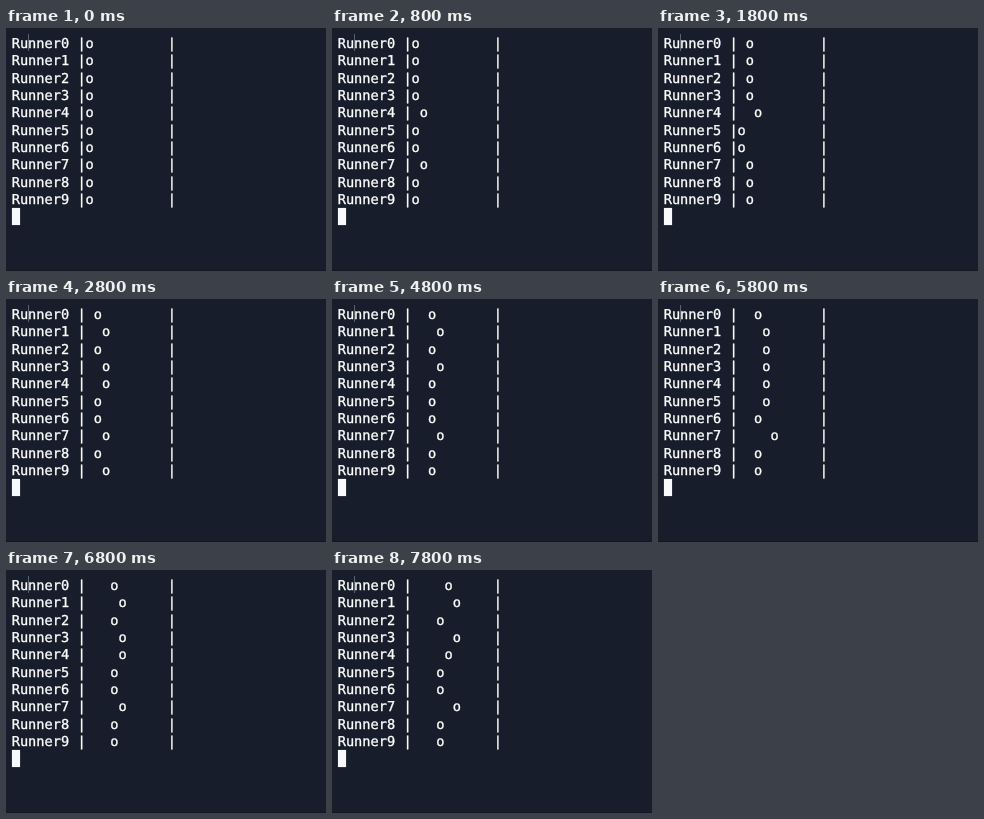
Recreate the animation shown at these times as an HTML page. Size 320 px wide and 243 px high, loop 8000 ms.

```html
<!DOCTYPE html>
<html lang="en">
<head>
<meta charset="utf-8">
<title>Runners</title>
<style>
  html, body { margin: 0; width: 100%; height: 100%; overflow: hidden; background: #171d2b; }
  pre {
    position: absolute; left: 5.7px; top: 8px; margin: 0;
    font: 13.65px/17.33px "DejaVu Sans Mono", monospace;
    text-rendering: geometricPrecision;
    color: #fff;
    -webkit-text-stroke: .35px #fff;
  }
  i { position: absolute; }
  .cursor { left: 6px; top: 180px; width: 8px; height: 17px; background: #f7f9fc; box-shadow: 0 0 1px #f7f9fc80; }
  .pointer { left: 22px; top: 6px; width: 1px; height: 17px; background: #5c626e; }
  .edge { left: 0; top: 242px; width: 320px; height: 1px; background: #121722; }
</style>
</head>
<body>
<i class="pointer"></i>
<pre id="track"></pre>
<i class="cursor"></i><i class="edge"></i>
<script>
  const LOOP = 8000, FIRST = 800, STEP = 1000, WIDTH = 10, RUNNERS = 10;
  // Runners that advance one cell at each tick
  const ticks = ['47', '0123489', '135679', '0357', '1268', '2457', '0134689', '0137'];
  const track = document.getElementById('track');
  let shown = -1;

  function lane(id, done) {
    const pos = done.filter(tick => tick.includes(id)).length;
    return `Runner${id} |${'o'.padStart(pos + 1).padEnd(WIDTH)}|`;
  }

  function draw() {
    const time = performance.now() % LOOP;
    const count = Math.max(0, Math.floor((time - FIRST) / STEP) + 1);
    if (count !== shown) {
      shown = count;
      const done = ticks.slice(0, count);
      track.textContent = Array.from({ length: RUNNERS }, (_, id) => lane(id, done)).join('\n');
    }
    requestAnimationFrame(draw);
  }
  draw();
</script>
</body>
</html>
```
